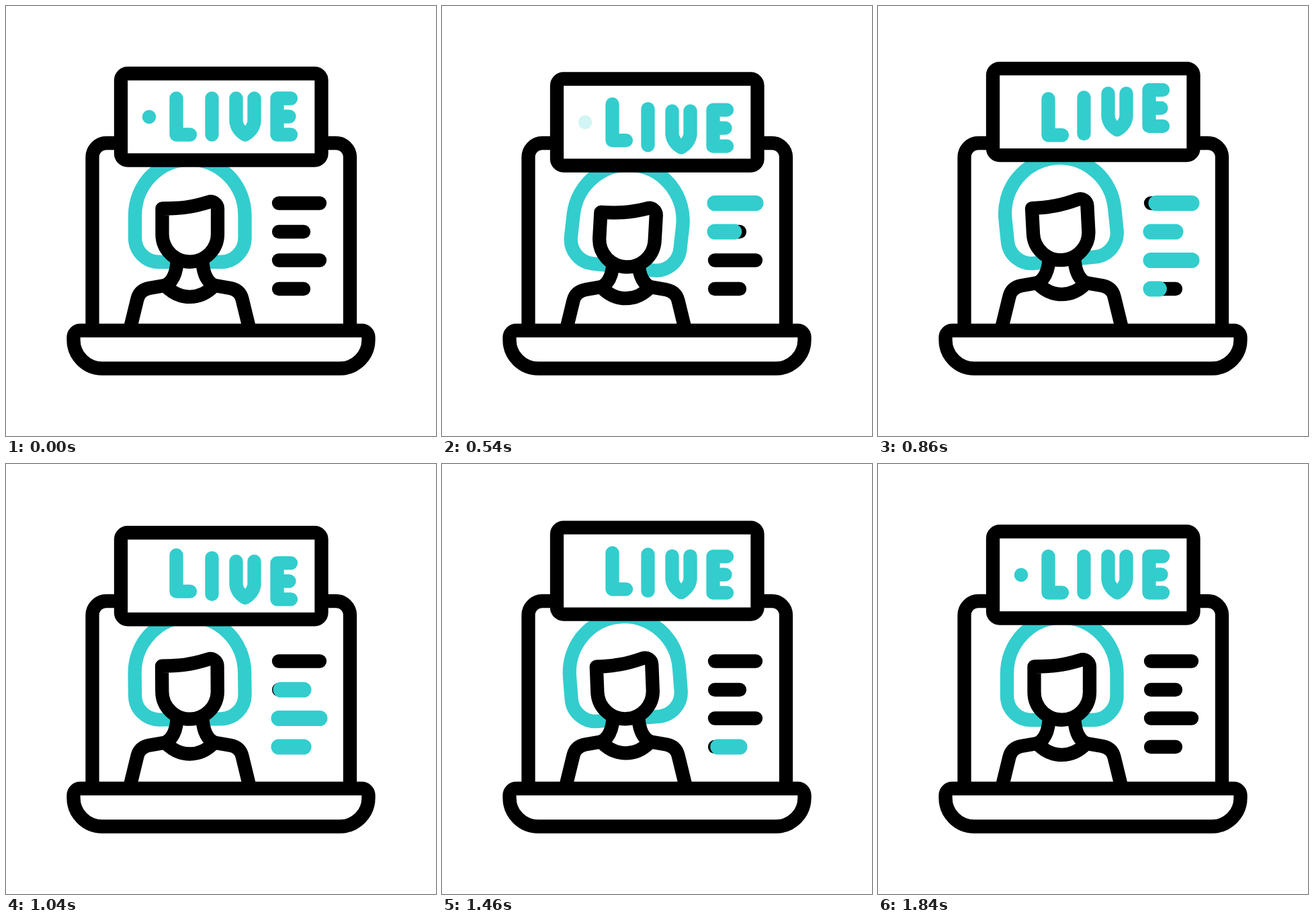
Write an HTML page that moves like this. It is 640 px wide and 640 px high and loops after 2100 ms.

```html
<!DOCTYPE html>
<html lang="en">
<head>
<meta charset="utf-8">
<title>Live lesson</title>
<style>
  html, body { margin: 0; width: 100%; height: 100%; overflow: hidden; background: #fff; }
  svg { display: block; width: 100%; height: 100%; }
  .ink, .teal { fill: none; stroke: #000; stroke-width: 20.3; stroke-linejoin: round; }
  .teal { stroke: #33cdcd; }
  .solid { fill: #fff; }
  .round { stroke-linecap: round; }
  #marks { stroke-width: 23; }
</style>
</head>
<body>
<svg viewBox="0 0 640 640">
  <path class="ink" d="M128.5 484V225a21 21 0 0 1 21-21H491a21 21 0 0 1 21 21V484"/>

  <g class="ink round" id="lines"></g>
  <g class="teal round" id="marks"></g>

  <path id="hair" class="teal" d="M255 381H228a36 36 0 0 1-36-36V312a81.75 83.5 0 0 1 163.5 0V345a36 36 0 0 1-36 36H292"/>
  <g id="torso" class="ink">
    <g id="side">
      <path d="M254.5 382C253 400 247 411 237 416"/>
      <path d="M239 415.5L213 420C203 422 197.5 428 195.5 436L183.8 484"/>
    </g>
    <use href="#side" transform="translate(547) scale(-1 1)"/>
    <path d="M237 416C258 438.5 289 438.5 310 416"/>
  </g>
  <path id="face" class="ink solid" d="M232.5 301.5C258 301.5 275 300 301 292C308 289.5 315 294.5 315 302V339.5a41.25 41.25 0 0 1-82.5 0Z"/>

  <g id="sign">
    <rect class="ink solid" x="171" y="100.5" width="298.5" height="129" rx="10"/>
    <circle id="dot" cx="213" cy="165" r="10.3" fill="#33cdcd"/>
    <g id="letters" class="teal round">
      <path d="M253.5 137.5V191.5H274"/>
      <path d="M306.5 137.5V191.5"/>
      <path d="M342.5 137.5V172Q344 184 356 191.5Q368 184 369.5 172V137.5"/>
      <path d="M424 137.5H403.5V191.5H424M403.5 164.5H421.5"/>
    </g>
  </g>

  <path class="ink solid" d="M110.500 483H529.500a10 10 0 0 1 10 10V497A42.500 42.500 0 0 1 497 539.500H143A42.500 42.500 0 0 1 100.500 497V493a10 10 0 0 1 10-10Z"/>
</svg>

<script>
const LOOP = 2100, STEP = 20, START = 200, END = 1820;
const $ = id => document.getElementById(id);
const clamp = v => Math.min(1, Math.max(0, v));

// Swings to and fro around `bias` in equal, sine-eased strokes that fade by `decay`; rests at 0.
function swing(t, { start = START, end = END, count, size, decay, bias = 0 }) {
  const position = clamp((t - start) / (end - start)) * (count + 1);
  const peak = k => k < 1 || k > count ? 0 : bias + size * (-decay) ** (k - 1);
  const k = Math.floor(position);
  const eased = (1 - Math.cos(Math.PI * (position - k))) / 2;
  return peak(k) + (peak(k + 1) - peak(k)) * eased;
}

const signSwing = { count: 4, size: 8.1, decay: 0.92 };
const letterSwing = { end: 1510, count: 5, size: 9.6, decay: 0.84, bias: 1.4 };
const headSwing = { count: 5, size: 11.3, decay: 0.2, bias: -1.5 };
const torsoSwing = { count: 5, size: 6.4, decay: 0.45, bias: -2.6 };
const tiltSwing = { start: 260, end: 1840, count: 4, size: 6.6, decay: 0.95 };

function dotOpacity(t) {
  if (t <= START || t >= END) return 1;
  const phase = (t - START) % ((END - START) / 3);
  return phase < 200 ? 1 - clamp(phase / 110) : clamp((phase - 300) / 180);
}

function addPath(parent, d) {
  const path = document.createElementNS("http://www.w3.org/2000/svg", "path");
  path.setAttribute("d", d);
  return $(parent).appendChild(path);
}

const rows = Array.from({ length: 4 }, (_, i) => {
  const y = 293.5 + 42.5 * i;
  const width = i % 2 ? 37 : 61;
  addPath("lines", `M406 ${y}h${width}`);
  return { y, width, mark: addPath("marks", "") };
});

function place(el, y, angle = 0, pivotY = 0) {
  el.setAttribute("transform", `translate(0 ${y}) rotate(${angle} 274 ${pivotY})`);
}

function draw(t) {
  place($("sign"), swing(t, signSwing));
  $("dot").setAttribute("opacity", dotOpacity(t));
  [...$("letters").children].forEach((letter, i) => place(letter, swing(t - 60 * i, letterSwing)));

  const bob = swing(t, headSwing);
  const tilt = swing(t, tiltSwing);
  place($("hair"), bob, tilt, 340);
  place($("face"), bob, tilt / 2, 370);
  place($("torso"), swing(t, torsoSwing));

  rows.forEach(({ y, width, mark }, i) => {
    const local = t - 200 * i;
    const end = Math.sin(Math.PI / 2 * clamp((local - 210) / 230));
    const start = clamp((local - 768) / 255) ** 2;
    mark.setAttribute("d", end > start ? `M${406 + width * start} ${y}h${width * (end - start)}` : "");
  });
}

const began = performance.now();
function tick() {
  const t = (performance.now() - began) % LOOP;
  draw(Math.floor(t / STEP) * STEP);
  requestAnimationFrame(tick);
}
tick();
</script>
</body>
</html>
```
